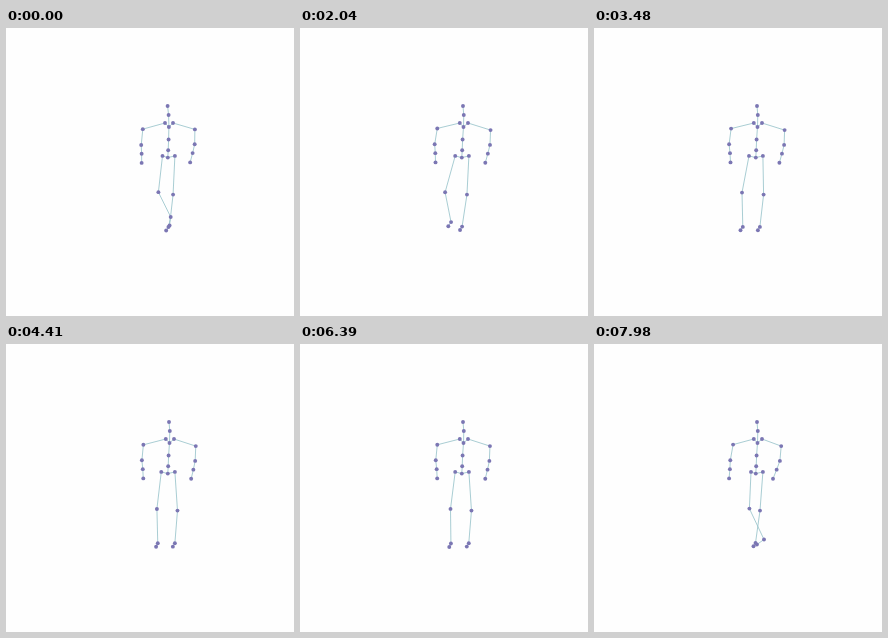
These frames come from a looping animation (288x288 px, 8000 ms). An HTML page:

```html
<!DOCTYPE html>
<html lang="en">
<head>
<meta charset="utf-8">
<title>Skeleton in slow motion</title>
<style>
  html, body { margin: 0; width: 100%; height: 100%; overflow: hidden; background: #fefefe; }
  svg { display: block; width: 100vw; height: 100vh; }
  line { stroke: #94c0c8; stroke-width: .8; }
  circle { fill: #7b76b3; }
</style>
</head>
<body>
<svg id="stage" viewBox="0 0 288 288"></svg>
<script>
const LOOP = 8000, STEP = 30;

// Stride angle in degrees: the step runs forward, lingers, then rewinds
const stride = [[0, 60], [2040, 142], [3480, 180], [4410, 224],
                [6390, 217], [7290, 72], [7980, 0]];

// Smooth curve through [time, value] points
function curve(points, t) {
  const last = points.length - 1;
  const slope = i => {
    const [t0, v0] = points[Math.max(i - 1, 0)];
    const [t1, v1] = points[Math.min(i + 1, last)];
    return (v1 - v0) / (t1 - t0);
  };
  let i = 0;
  while (i < last - 1 && t >= points[i + 1][0]) i++;
  const [t0, v0] = points[i], [t1, v1] = points[i + 1];
  const h = t1 - t0, u = (t - t0) / h, v = 1 - u;
  return v * v * ((1 + 2 * u) * v0 + u * h * slope(i)) +
         u * u * ((1 + 2 * v) * v1 - v * h * slope(i + 1));
}

const between = (a, b) => [(a[0] + b[0]) / 2 + .2, (a[1] + b[1]) / 2 - .2];

function pose(t) {
  const a = curve(stride, t) * Math.PI / 180;
  const c = Math.cos(a), s = Math.sin(a), c2 = Math.cos(2 * a), s2 = Math.sin(2 * a);
  const lean = Math.exp(-t / 500); // the opening lean fades out

  const p = {
    head: [163 - 1.4 * lean, 78],
    neck: [163.8 - 1.2 * lean, 87],
    chest: [163.5 - .6 * lean, 99],
    spine: [162.6, 111.5],
    waist: [162.2, 122.3],
    pelvis: [161.8, 129.6],

    collarL: [159.8 - .8 * lean, 95],
    shoulderL: [138.1 + c - 1.8 * lean, 100.6 - .3 * s + .8 * lean],
    elbowL: [135.7 + .6 * c - .9 * s, 116.3 + .7 * lean],
    handL: [135.8 - .7 * c - 1.4 * s + 1.4 * lean, 134.4 + .5 * lean],
    hipL: [156 + c, 127.9],
    kneeL: [150.4 + 3.7 * c - 4.5 * s + 1.3 * c2 + 4.7 * lean, 164.6 - .5 * s],
    ankleL: [159.4 + 10.6 * c,
             194.9 - 1.7 * c - 5.2 * s + 2.3 * c2 - .5 * s2 + lean],
    toeL: [155.5 + 8.2 * c + .7 * s - .8 * c2 + s2 + lean,
           199.4 - .9 * c - 3 * s + 2 * c2 + .5 * s2 + 3.2 * lean],

    collarR: [168 - lean, 95],
    shoulderR: [188.9 - 1.7 * c + .5 * s + .4 * lean, 102.1 - .7 * lean],
    elbowR: [188 - 2.1 * c + .5 * s + 1.3 * lean, 116.9 - .7 * lean],
    handR: [182.9 - 3.2 * c - .7 * c2 + 2.5 * lean, 134.8 - .4 * lean],
    hipR: [168.9, 127.9],
    kneeR: [167.8 - 1.8 * c - 1.3 * s + 1.5 * s2, 166.6],
    ankleR: [163.7 - 2.2 * c - 2 * s + 2.2 * s2 + .8 * lean, 198.9 - .5 * s - lean]
  };
  p.toeR = [p.ankleR[0] - 2 - 1.4 * lean, p.ankleR[1] + 3.4 + 1.6 * lean];
  p.wristL = between(p.elbowL, p.handL);
  p.wristR = between(p.elbowR, p.handR);
  return p;
}

const chains = ['head neck chest spine waist pelvis'];
for (const side of 'LR')
  chains.push(`chest collar${side} shoulder${side} elbow${side} wrist${side} hand${side}`,
              `pelvis hip${side} knee${side} ankle${side} toe${side}`);

const stage = document.getElementById('stage');
const set = (el, attrs) => {
  for (const k in attrs) el.setAttribute(k, attrs[k]);
};
const add = tag =>
  stage.appendChild(document.createElementNS('http://www.w3.org/2000/svg', tag));

const bones = chains.flatMap(chain => {
  const names = chain.split(' ');
  return names.slice(1).map((to, i) => ({ from: names[i], to, el: add('line') }));
});
const dots = Object.keys(pose(0)).map(name => ({ name, el: add('circle') }));

function draw(time) {
  const p = pose(Math.floor((time % LOOP) / STEP) * STEP);
  for (const { from, to, el } of bones)
    set(el, { x1: p[from][0], y1: p[from][1], x2: p[to][0], y2: p[to][1] });
  for (const { name, el } of dots)
    set(el, { cx: p[name][0], cy: p[name][1], r: 1.95 });
}

const start = performance.now();
function tick() {
  draw(performance.now() - start);
  requestAnimationFrame(tick);
}
tick();
</script>
</body>
</html>
```
